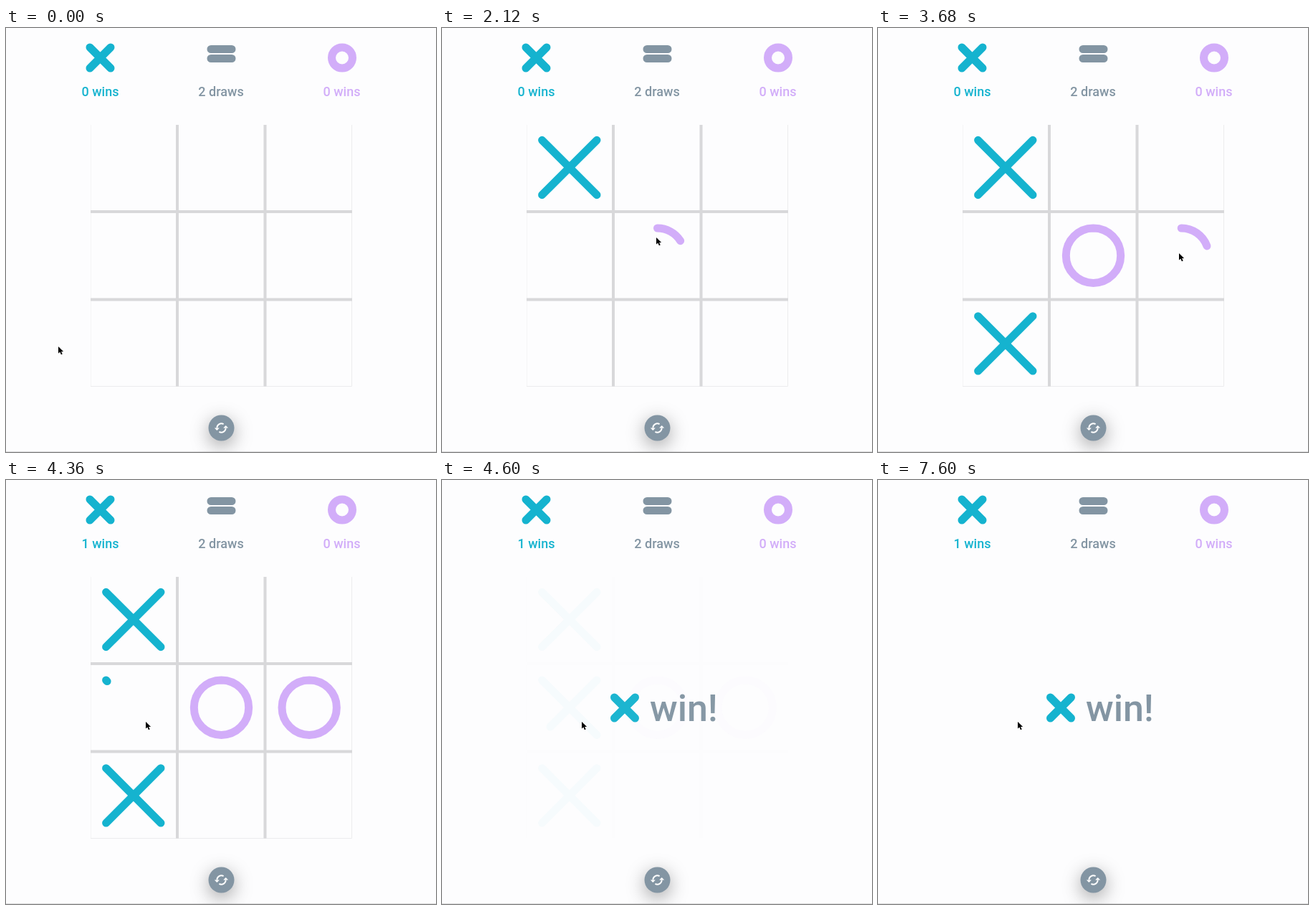
An HTML page for the animation above (7640 ms loop, 600x591 px).

```html
<!DOCTYPE html>
<html lang="en">
<head>
<meta charset="utf-8">
<title>Tic-tac-toe</title>
<style>
  html, body { margin: 0; width: 100%; height: 100%; overflow: hidden; background: #fdfdfe; }
  svg { display: block; width: 600px; height: 591px; }
  text { font: 500 18px Roboto, sans-serif; text-anchor: middle; }
  .x, .o, .eq { fill: none; stroke-width: 11; stroke-linecap: round; }
  .x { stroke: #15b3cf; }
  .o { stroke: #d2adf9; }
  .eq { stroke: #8395a3; }
  .tx { fill: #15b3cf; }
  .to { fill: #d2adf9; }
  .tg { fill: #8395a3; }
  .win { font-size: 52px; text-anchor: start; }
  .grid { fill: none; stroke: #d8d8da; stroke-width: 4; }
  .edge { fill: none; stroke: #ececee; }
  .knob { fill: #8395a3; filter: drop-shadow(0 7px 13px rgba(0, 0, 0, .36)); }
</style>
</head>
<body>
<svg viewBox="0 0 600 591">
  <defs><path id="cross" d="M-14.5-14.5l29 29M14.5-14.5l-29 29"/></defs>
  <path d="M0 590.5H600" stroke="#dededf"/>

  <use href="#cross" class="x" x="131.5" y="41.5"/>
  <path class="eq" d="M286 29.5h29M286 42.5h29"/>
  <circle class="o" cx="469" cy="41.5" r="14.5"/>
  <text class="tx" id="before" x="131.5" y="94.5">0 wins</text>
  <text class="tx" id="after" x="131.5" y="94.5">1 wins</text>
  <text class="tg" x="300" y="94.5">2 draws</text>
  <text class="to" x="468.5" y="94.5">0 wins</text>

  <g id="board">
    <path class="edge" d="M118.5 135V499" opacity=".4"/>
    <path class="edge" d="M118 499.5H482.5V135"/>
    <path class="grid" d="M239 135V499.5M361.5 135V499.5M118 256H483M118 378.5H483"/>
  </g>

  <g id="result">
    <use href="#cross" class="x" x="255" y="317.5"/>
    <text class="tg win" x="290" y="336">win!</text>
  </g>

  <circle class="knob" cx="300.5" cy="557.5" r="18"/>
  <g transform="translate(300.5 557.5) scale(.88)">
    <path d="M7 0A7 7 0 0 1-3.5 6.06M-7 0A7 7 0 0 1 3.5-6.06" fill="none" stroke="#fff" stroke-width="2.1"/>
    <path d="M7-4l4 4H3zM-7 4l-4-4h8z" fill="#fff"/>
  </g>

  <path id="cursor" d="M0 0V9.6L2.3 7.6 3.9 11.2 5.7 10.4 4.1 6.9H7.1Z"
        fill="#000" stroke="#fff" stroke-width=".9" paint-order="stroke"/>
</svg>
<script>
const LOOP = 7640, PITCH = 122.7, ARM = 38.2;
const STROKE = 150, SECOND = 162, RING = 300;
const FADE = 4365, SCORE = 4345;
const $ = id => document.getElementById(id);

// steps: [ms, value, easing towards the next step]
function run(el, prop, steps) {
  const all = [[0, steps[0][1]], ...steps, [LOOP, steps[steps.length - 1][1]]];
  el.animate(
    all.map(([ms, value, easing = 'linear']) => ({ offset: ms / LOOP, [prop]: value, easing })),
    { duration: LOOP, iterations: Infinity });
}

const toggle = (el, ms, from, to) => run(el, 'opacity', [[ms, from], [ms, to]]);
const fade = (el, from, to) => run(el, 'opacity', [[FADE, from, 'ease'], [FADE + 300, to]]);

function draw(kind, d, start, length) {
  const path = document.createElementNS('http://www.w3.org/2000/svg', 'path');
  const attrs = { class: kind, d, pathLength: 1, 'stroke-dasharray': '1 2' };
  for (const name in attrs) path.setAttribute(name, attrs[name]);
  $('board').append(path);
  toggle(path, start, 0, 1);
  run(path, 'strokeDashoffset', [[start, .999, 'ease'], [start + length, 0]]);
}

function mark(kind, col, row, start) {
  const x = 177.8 + col * PITCH, y = 194.5 + row * PITCH, a = ARM;
  if (kind === 'o') {
    draw('o', `M${x} ${y - a}a${a} ${a} 0 0 1 0 ${2 * a}a${a} ${a} 0 0 1 0 ${-2 * a}`, start, RING);
  } else {
    draw('x', `M${x - a} ${y - a}l${2 * a} ${2 * a}`, start, STROKE);
    draw('x', `M${x + a} ${y - a}l${-2 * a} ${2 * a}`, start + SECOND, STROKE);
  }
}

mark('x', 0, 0, 774);
mark('o', 1, 1, 2080);
mark('x', 0, 2, 2840);
mark('o', 2, 1, 3635);
mark('x', 0, 1, 4356);

toggle($('before'), SCORE, 1, 0);
toggle($('after'), SCORE, 0, 1);
fade($('board'), 1, 0);
fade($('result'), 0, 1);

run($('cursor'), 'transform', [
  [0, 73, 444, 'ease-in-out'], [560, 160, 209],
  [1660, 160, 209, 'ease-in-out'], [1980, 299, 292],
  [2460, 299, 292, 'ease-in-out'], [2740, 219, 441],
  [3040, 219, 441, 'ease-in'], [3240, 335, 313, 'ease-out'], [3400, 420, 314],
  [3840, 420, 314, 'ease-in-out'], [4120, 195, 337],
].map(([ms, x, y, easing]) => [ms, `translate(${x}px, ${y}px)`, easing]));
</script>
</body>
</html>
```
